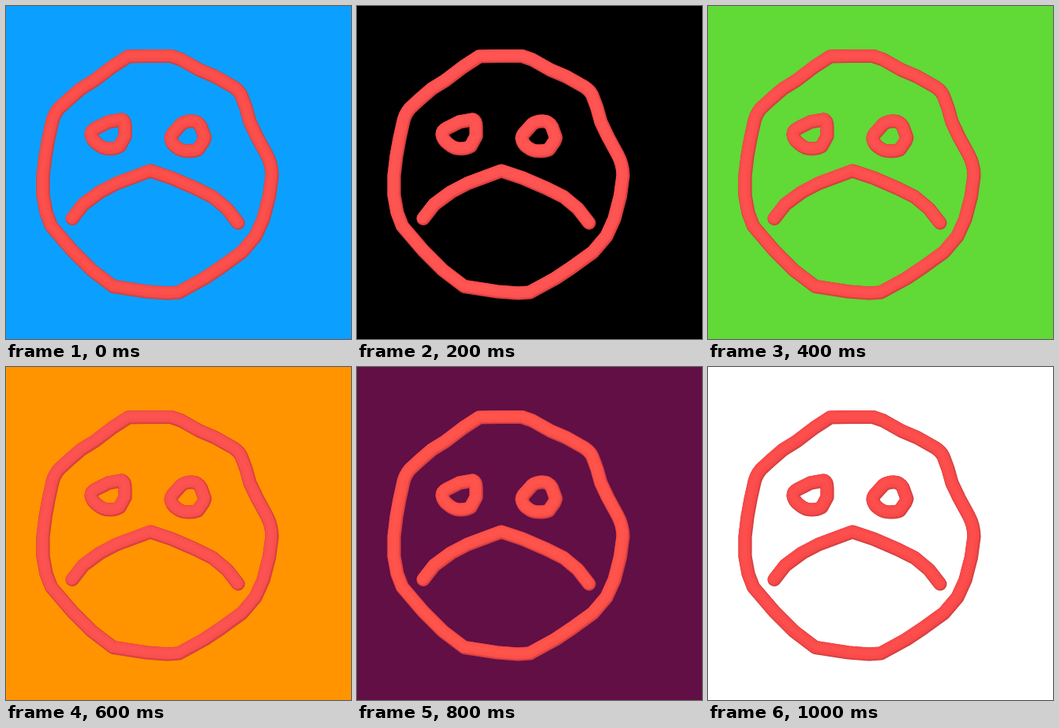
Recreate the animation shown at these times as an HTML page. Size 437x422 px, loop 1.2 s.

```html
<!DOCTYPE html>
<html lang="en">
<head>
<meta charset="utf-8">
<title>Sad face</title>
<style>
  html, body { margin: 0; width: 100%; height: 100%; overflow: hidden; }
  svg { display: block; width: 100%; height: 100%; }
  .layer { fill: none; stroke-linecap: round; stroke-linejoin: round; }
  .ridges { stroke-linecap: butt; stroke-dasharray: 1 2.2; }
</style>
</head>
<body>
<svg viewBox="0 0 437 422">
  <defs>
    <g id="face">
      <path d="M155 64L182 63.5L209 63.5L222 68L245 81L265 89.5L288 102.5Q295 107 298 113L304 129L309 147L318 166L330 188Q337 201 337 215L333.5 241L326 270L316 292L299 312L272 331.5L251 345.5L219 363L204 364L178 362L136 355.5L109 335L84 310L57.5 279L51 262L47 240L47 215L50 190L54 168L58 150Q60 138 67 130L80 118L95 105L112 94.5L135 77Z"/>
      <path d="M147 144L130 147L114 155Q108 158 108 163Q109 170 116 175Q123 181 131 181Q139 181 144 178L151 165L151 153Q151 146 147 144Z"/>
      <path d="M236 146Q227 146 222 150L213 160Q209 164 209 168Q210 175 216 179Q222 184 230 184Q239 184 243 182L250 172L252 167L247 153Q243 146 236 146Z"/>
      <path d="M84 269.5L98 251.5L119 236L140 225L160 217.5L183 209L210 218L240 231L262 242L280 257L294 275"/>
    </g>
  </defs>
  <rect id="back" width="437" height="422"/>
  <g id="ink"></g>
</svg>
<script>
const STEP = 200;
const scenes = [
  { back: '#0ba0ff', body: '#fa4c49' },
  { back: '#000000', body: '#ff5252' },
  { back: '#61d936', body: '#fc4d4d' },
  { back: '#ff9300', body: '#fb5050' },
  { back: '#610f45', body: '#ff5149' },
  { back: '#ffffff', body: '#fc4a4a' }
];

// Stacked strokes, lit from the upper left, give the line its rounded look.
const layers = [
  { width: 17.2, color: '#cc3e3e' },
  { width: 16, shift: '-.4 -.5', color: '#e64545' },
  { width: 14, shift: '-.9 -1.1' },
  { width: 7, shift: '-1.2 -1.5', color: '#ff6058', opacity: .25 },
  { width: 16.5, color: '#bd302f', opacity: .06, name: 'layer ridges' }
];

const ink = document.getElementById('ink');
const back = document.getElementById('back');

for (const layer of layers) {
  const use = document.createElementNS('http://www.w3.org/2000/svg', 'use');
  const attrs = {
    href: '#face',
    class: layer.name || 'layer',
    stroke: layer.color || 'currentColor',
    'stroke-width': layer.width,
    'stroke-opacity': layer.opacity || 1,
    transform: `translate(${layer.shift || '0 0'})`
  };
  if (layer.name) attrs.fill = 'none';
  for (const key in attrs) use.setAttribute(key, attrs[key]);
  ink.append(use);
}

function draw(time) {
  const scene = scenes[Math.floor(time / STEP) % scenes.length];
  back.setAttribute('fill', scene.back);
  ink.setAttribute('color', scene.body);
}

const start = performance.now();

function tick() {
  draw(performance.now() - start);
  requestAnimationFrame(tick);
}

tick();
</script>
</body>
</html>
```
